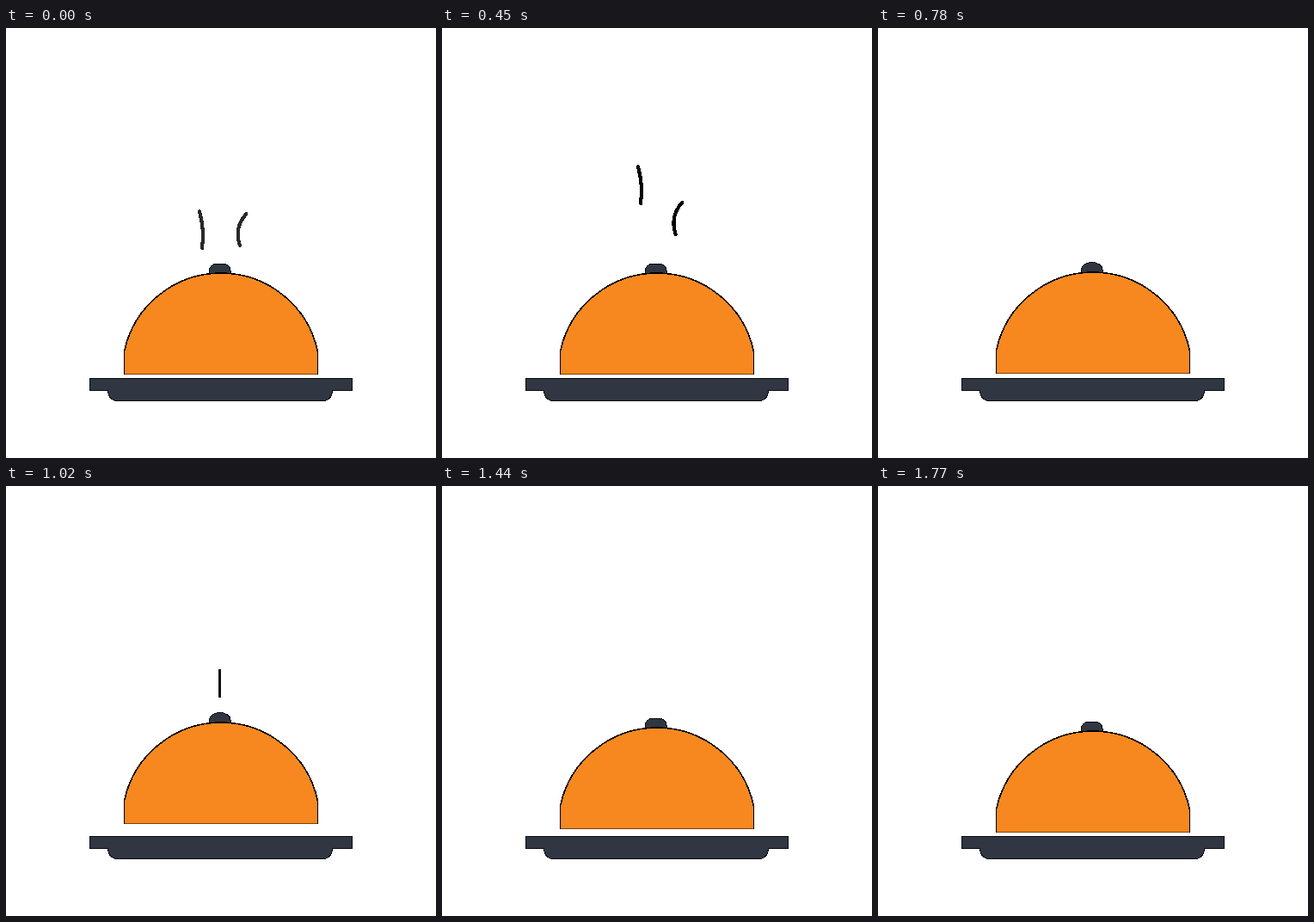
These frames come from a looping animation (500x500 px, 1920 ms). An HTML page:

```html
<!DOCTYPE html>
<html lang="en">
<head>
<meta charset="utf-8">
<title>Steaming dish</title>
<style>
  html, body { margin: 0; width: 100%; height: 100%; overflow: hidden; background: #fff; }
  svg { display: block; width: 100vw; height: 100vh; }
</style>
</head>
<body>
<svg viewBox="0 0 500 500" shape-rendering="crispEdges">
  <g fill="none" stroke="#000" stroke-width="4.2" stroke-linecap="round">
    <path id="left" d="M225 213 Q231 236 228 256"/>
    <path id="right" d="M279.5 216 Q265 232 272 253"/>
    <path id="middle" d="M248.5 213 V246" stroke-width="3" stroke-linecap="butt"/>
  </g>
  <g id="lid">
    <path id="knob" fill="#303742" stroke="#0a0d11"/>
    <path fill="#f6881f" d="M137.5 403 V376.2 A115 115 0 0 1 362.5 376.2 V403 Z"/>
    <path fill="none" stroke="#000" stroke-width="1.6" d="M137.5 376.2 A115 115 0 0 1 362.5 376.2"/>
    <path stroke="#000" d="M137.5 376 V403 M362.5 376 V403"/>
    <path stroke="#7a430c" d="M138 402.5 H362"/>
  </g>
  <g fill="#303742" stroke="#0a0d11">
    <path d="M118.5 421 Q119 433.5 130 433.5 H368 Q379 433.5 379.5 421 Z"/>
    <path d="M97.5 407.5 H402.5 V421.5 H97.5 Z"/>
    <path stroke="none" d="M119 420 H379 V423 H119 Z"/>
  </g>
</svg>
<script>
const LOOP = 1920, STEP = 30;
const FLAT_KNOB = "M236.5 286 V282 A7.5 7.5 0 0 1 244 274.5 H253.5 A7.5 7.5 0 0 1 261 282 V286 Z";
const ROUND_KNOB = "M236.5 286 V282 A12.25 8.5 0 0 1 261 282 V286 Z";
const el = id => document.getElementById(id);
const progress = (t, from, to) => Math.min(1, Math.max(0, (t - from) / (to - from)));

// Slow lift, then a quick drop that settles softly.
function hop(t, start, peak, end, height, power) {
  return t < peak
    ? height * progress(t, start, peak) ** power
    : height * (1 - progress(t, peak, end)) ** 4;
}

function place(id, dx, dy, opacity) {
  el(id).setAttribute("transform", `translate(${dx} ${dy})`);
  el(id).setAttribute("opacity", opacity);
}

function render(t) {
  const rise = t / 450;
  const sideOpacity = (0.84 + 0.16 * progress(t, 0, 90)) * (1 - progress(t, 480, 540));
  place("left", 3 * rise, -52 * rise, sideOpacity);
  place("right", -0.3 * rise, -13 * rise, sideOpacity);
  place("middle", 0, -(t - 1020) / 15, 0.95 * progress(t, 930, 1020) * (1 - progress(t, 1140, 1200)));

  const lift = t < 1200
    ? hop(t, 570, 1040, 1200, 11.8, 3)
    : hop(t, 1200, 1590, 1770, 11.3, 2);
  place("lid", 0, -Math.round(lift), 1);
  el("knob").setAttribute("d", t >= 570 && t < 1200 ? ROUND_KNOB : FLAT_KNOB);
}

const begin = performance.now();
function tick() {
  const t = (performance.now() - begin) % LOOP;
  render(Math.floor(t / STEP) * STEP);
  requestAnimationFrame(tick);
}
tick();
</script>
</body>
</html>
```
